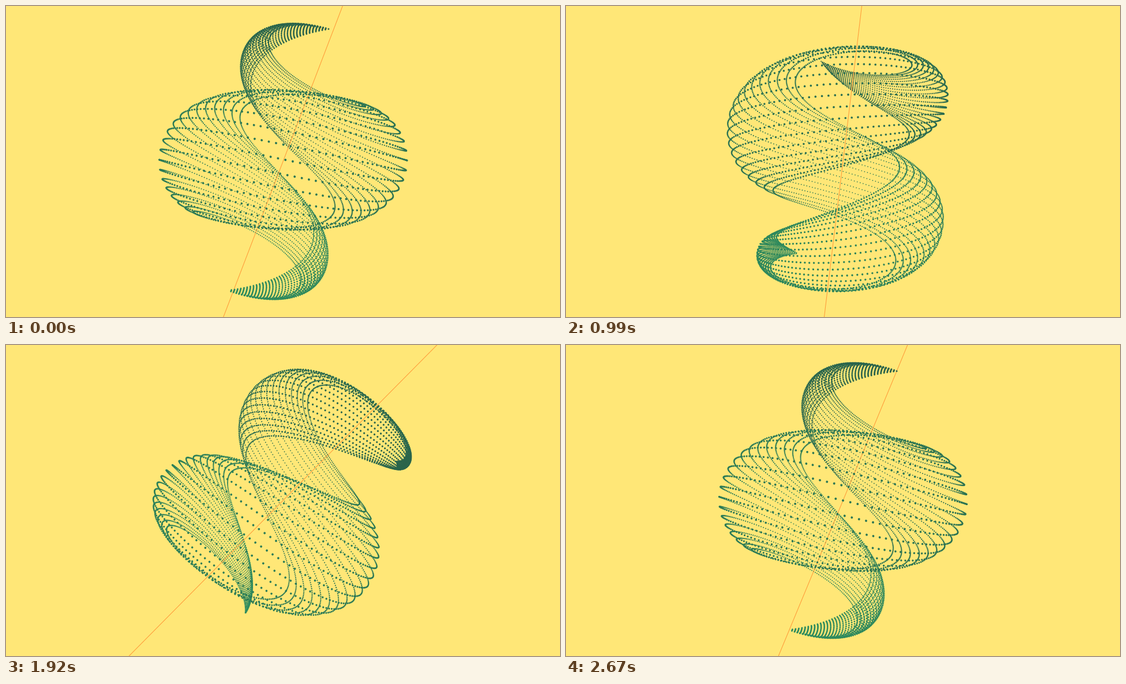
An HTML page with a canvas that plays this animation: 960x540 px, repeating every 2.7 s.

```html
<!DOCTYPE html>
<html lang="en">
<head>
<meta charset="utf-8">
<title>Helical shell</title>
<style>
  html, body { margin: 0; width: 100%; height: 100%; overflow: hidden; background: #ffe777; }
  canvas { display: block; width: 960px; height: 540px; }
</style>
</head>
<body>
<canvas id="stage" width="960" height="540"></canvas>
<script>
const ctx = document.getElementById('stage').getContext('2d');
const TAU = Math.PI * 2;
const STEPS = 90, STEP_MS = 30;
const EYE = 467.65;          // camera distance
const RADIUS = 96.5;         // helix radius and largest tube radius
const RINGS = 320, STRINGS = 20;
const TOP = [42, 98, 74], BOTTOM = [46, 140, 94];

const mix = k => `rgb(${TOP.map((c, i) => Math.round(c + (BOTTOM[i] - c) * k))})`;

// Half a tube wound twice around the vertical axis, pointed at both ends.
const rings = Array.from({ length: RINGS }, (_, i) => {
  const w = i / RINGS;
  const tube = Math.sin(Math.PI * w);
  const dots = Array.from({ length: STRINGS }, (_, j) => {
    const v = Math.PI * (0.5 - j / STRINGS);
    return {
      r: RADIUS * (1 + tube * Math.cos(v)),
      y: RADIUS * (2 - 4 * w + tube * Math.sin(v))
    };
  });
  return { angle: 2 * TAU * w, color: mix(w), dots };
});

function drawDots(spin, front) {
  for (const { angle, color, dots } of rings) {
    const c = Math.cos(angle + spin), s = Math.sin(angle + spin);
    if (c > 0 !== front) continue;
    ctx.fillStyle = color;
    ctx.beginPath();
    for (const { r, y } of dots) {
      const scale = EYE / (EYE - r * c);
      const px = -r * s * scale, py = -y * scale, size = 1.17 * scale;
      ctx.moveTo(px + size, py);
      ctx.arc(px, py, size, 0, TAU);
    }
    ctx.fill();
  }
}

function drawAxis() {
  ctx.strokeStyle = 'rgba(255, 138, 44, 0.85)';
  ctx.lineWidth = 1;
  ctx.beginPath();
  ctx.moveTo(0, -500);
  ctx.lineTo(0, 500);
  ctx.stroke();
}

function render(ms) {
  const step = Math.floor(ms / STEP_MS) % STEPS;
  const spin = TAU * (step + 1) / STEPS;
  ctx.setTransform(1, 0, 0, 1, 0, 0);
  ctx.fillStyle = '#ffe777';
  ctx.fillRect(0, 0, 960, 540);
  ctx.translate(480, 270);
  ctx.rotate(Math.PI / 8 * (1 - Math.sin(spin)));
  drawDots(spin, false);
  drawAxis();
  drawDots(spin, true);
}

const start = performance.now();
function tick() {
  render(performance.now() - start);
  requestAnimationFrame(tick);
}
tick();
</script>
</body>
</html>
```
